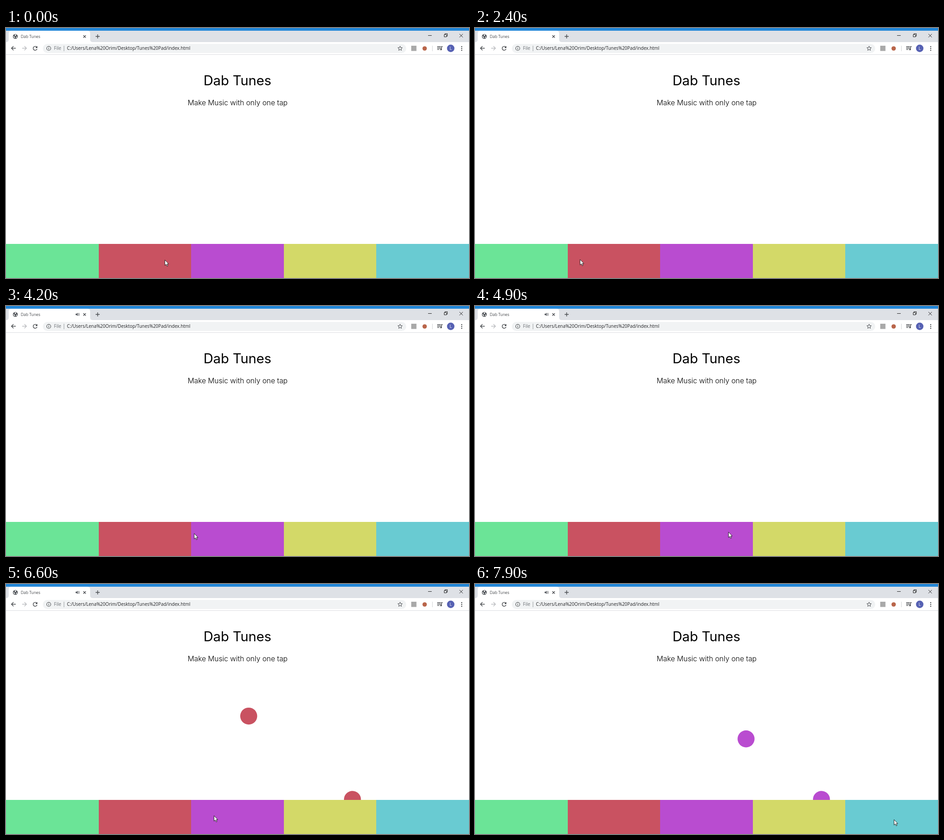
Animation, 1018 px wide and 550 px high, one loop 8 s. Source, as an HTML page:

```html
<!DOCTYPE html>
<html lang="en">
<head>
<meta charset="utf-8">
<title>Dab Tunes</title>
<style>
  html, body { margin: 0; width: 100%; height: 100%; overflow: hidden; background: #fff; }
  svg { display: block; width: 100vw; height: 100vh; }
  .ui { font-family: "Open Sans", "Noto Sans", sans-serif; }
  .page { font-family: Inter, Roboto, sans-serif; text-anchor: middle; }
  .line { fill: none; stroke: #44474b; stroke-width: 1.4; }
</style>
</head>
<body>
<svg viewBox="0 0 1018 550" preserveAspectRatio="none">
  <rect width="1018" height="550" fill="#fff"/>

  <!-- tab strip -->
  <rect width="1018" height="6" fill="#2387d8"/>
  <rect y="6" width="1018" height="25" fill="#dee1e6"/>
  <path d="M0 31Q6 31 6 25V12Q6 6 12 6H179Q185 6 185 12V25Q185 31 191 31Z" fill="#fff"/>
  <circle cx="20.5" cy="18.5" r="5.3" fill="#4d5156"/>
  <path d="M16.5 17.2L19 19.5L20 22.5Q16.2 21.5 16.5 17.2ZM19.5 14.3L22.5 14.6L22 17L19.3 17.6ZM22 19L24.6 19.2Q24 21.5 22.4 22.2Z" fill="#fff"/>
  <text class="ui" x="32.5" y="22" font-size="8.7" fill="#45484c">Dab Tunes</text>
  <g id="speaker" fill="#5f6368">
    <path d="M153 17H155L157.7 14.8V22.2L155 20H153Z"/>
    <path d="M159 16.3Q160.4 18.5 159 20.7M160.2 15Q162.4 18.5 160.2 22" fill="none" stroke="#5f6368" stroke-width=".9"/>
  </g>
  <path class="line" d="M170 16L175.5 21.5M175.5 16L170 21.5"/>
  <path class="line" d="M197 18.5H206M201.5 14V23"/>
  <g fill="none" stroke="#222" stroke-width="1">
    <path d="M928 16.5H936M997 13L1004.5 20.5M1004.5 13L997 20.5"/>
    <path d="M963.5 14.5H968.5V19.5H963.5ZM965 14V12.5H970.5V18H969"/>
  </g>

  <!-- toolbar -->
  <path d="M0 58.5H1018" stroke="#dadce0"/>
  <path class="line" d="M21.5 44.5H12M16.5 40L12 44.5L16.5 49"/>
  <path class="line" d="M35.5 44.5H45M40.5 40L45 44.5L40.5 49" style="stroke:#b9bbbe"/>
  <path class="line" d="M67.6 42.2A4.3 4.3 0 1 0 68.2 46"/>
  <path d="M69 39.5V44H64.5Z" fill="#44474b"/>
  <rect x="81" y="35" width="799" height="20" rx="10" fill="#f1f3f4"/>
  <circle class="line" cx="94" cy="44.7" r="4.5" style="stroke-width:1.1"/>
  <path d="M94 44V47.3M94 41.8V43" stroke="#44474b" stroke-width="1.1"/>
  <g class="ui" font-size="9.95">
    <text x="105.5" y="48.4" fill="#6a6e73">File</text>
    <text x="134" y="48.4" fill="#202124">C:/Users/Lena%20Orim/Desktop/Tunes%20Pad/index.html</text>
  </g>
  <path d="M127.5 39V51" stroke="#9a9da1"/>
  <path id="star" class="line" style="stroke-width:1"/>
  <rect x="891" y="39" width="11.5" height="11.5" fill="#a9a9a9"/>
  <circle cx="920.5" cy="45" r="4.8" fill="#b9654a"/>
  <path d="M937.5 39V51" stroke="#d0d2d5"/>
  <path class="line" d="M948 41H956M948 44.2H956M948 47.4H953M957.5 47V41H960"/>
  <circle cx="956.4" cy="47.3" r="1.7" fill="#44474b"/>
  <circle cx="977.8" cy="44.7" r="8.2" fill="#5661b3"/>
  <text class="ui" x="977.8" y="48" font-size="9" fill="#fff" text-anchor="middle">L</text>
  <g fill="#44474b"><circle cx="1002" cy="41" r="1.2"/><circle cx="1002" cy="45" r="1.2"/><circle cx="1002" cy="49" r="1.2"/></g>

  <!-- page -->
  <g class="page" fill="#000">
    <text x="508.8" y="126" font-size="29.6">Dab Tunes</text>
    <text x="509.3" y="169.8" font-size="15.85" font-weight="300">Make Music with only one tap</text>
  </g>
  <g id="bubbles"></g>
  <g id="pads" shape-rendering="crispEdges"></g>
  <path id="cursor" d="M0 0V12L2.8 9.5L4.8 13.8L6.7 12.9L4.8 8.8H8.4Z" fill="#fff" stroke="#111" stroke-width=".9"/>
</svg>

<script>
const LOOP = 8000, STEP = 100, JUMP = 1000, RADIUS = 18.7;
const $ = id => document.getElementById(id);
const colors = ["#6be497", "#c95261", "#b94cd0", "#d3d968", "#69cbd2"];

// [tap time, pad]
const taps = [[2883, 0], [5666, 1], [5867, 1], [6083, 1], [6983, 2], [7167, 2], [7316, 2]];

// [time, x, y] of the pointer tip
const pointer = [
  [0, 349.3, 510.3], [1200, 300, 511], [2400, 231, 509.3], [2860, 185, 512],
  [3400, 238.5, 504.3], [4900, 557.3, 497.3], [5600, 335, 510], [6200, 331.5, 510.3],
  [6900, 539, 509.3], [7320, 540, 510], [7900, 921.3, 518.3]
];

function add(parent, tag, attrs) {
  const node = document.createElementNS("http://www.w3.org/2000/svg", tag);
  for (const key in attrs) node.setAttribute(key, attrs[key]);
  return parent.appendChild(node);
}

const clamp = v => Math.max(0, Math.min(1, v));
const mix = (a, b, k) => a + (b - a) * k;
const smooth = k => k * k * (3 - 2 * k);

// CSS "ease": cubic-bezier(.25, .1, .25, 1)
function ease(x) {
  const bezier = (s, a, b) => 3 * (1 - s) ** 2 * s * a + 3 * (1 - s) * s * s * b + s ** 3;
  let low = 0, high = 1;
  for (let i = 0; i < 24; i++) {
    const mid = (low + high) / 2;
    if (bezier(mid, .25, .25) < x) low = mid; else high = mid;
  }
  return bezier(low, .1, 1);
}

// Left 20% -> 50% -> 80%, bottom 0 -> 50% -> 0
function jump(k) {
  const rising = k < .5;
  const e = ease(rising ? k * 2 : k * 2 - 1);
  const left = mix(rising ? .2 : .5, rising ? .5 : .8, e);
  const height = rising ? e : 1 - e;
  return [1018 * left + RADIUS, 550 - RADIUS - 245.5 * height];
}

function pointerAt(t) {
  const i = pointer.findIndex(p => p[0] > t);
  if (i < 0) return pointer.at(-1).slice(1);
  const [t0, x0, y0] = pointer[i - 1], [t1, x1, y1] = pointer[i];
  const k = smooth((t - t0) / (t1 - t0));
  return [mix(x0, x1, k), mix(y0, y1, k)];
}

colors.forEach((fill, i) => add($("pads"), "rect", { x: Math.round(203.6 * i), y: 475, width: 204, height: 75, fill }));
const bubbles = taps.map(([, pad]) => add($("bubbles"), "circle", { r: RADIUS, fill: colors[pad] }));

const star = Array.from({ length: 10 }, (_, i) => {
  const r = i % 2 ? 2.3 : 5.2, a = i * Math.PI / 5;
  return [866.5 + r * Math.sin(a), 45 - r * Math.cos(a)];
});
$("star").setAttribute("d", "M" + star.join("L") + "Z");

function render(time) {
  const t = time < 2 * STEP ? 0 : Math.floor(time / STEP) * STEP;
  taps.forEach(([start], i) => {
    const k = (t - start) / JUMP, active = k >= 0 && k < 1;
    const [x, y] = jump(clamp(k));
    bubbles[i].setAttribute("cx", x);
    bubbles[i].setAttribute("cy", y);
    bubbles[i].setAttribute("visibility", active ? "visible" : "hidden");
  });
  $("speaker").setAttribute("opacity", clamp((t - 3330) / 200));
  $("cursor").setAttribute("transform", `translate(${pointerAt(t)})`);
}

const begin = performance.now();
function tick() {
  render((performance.now() - begin) % LOOP);
  requestAnimationFrame(tick);
}
tick();
</script>
</body>
</html>
```
